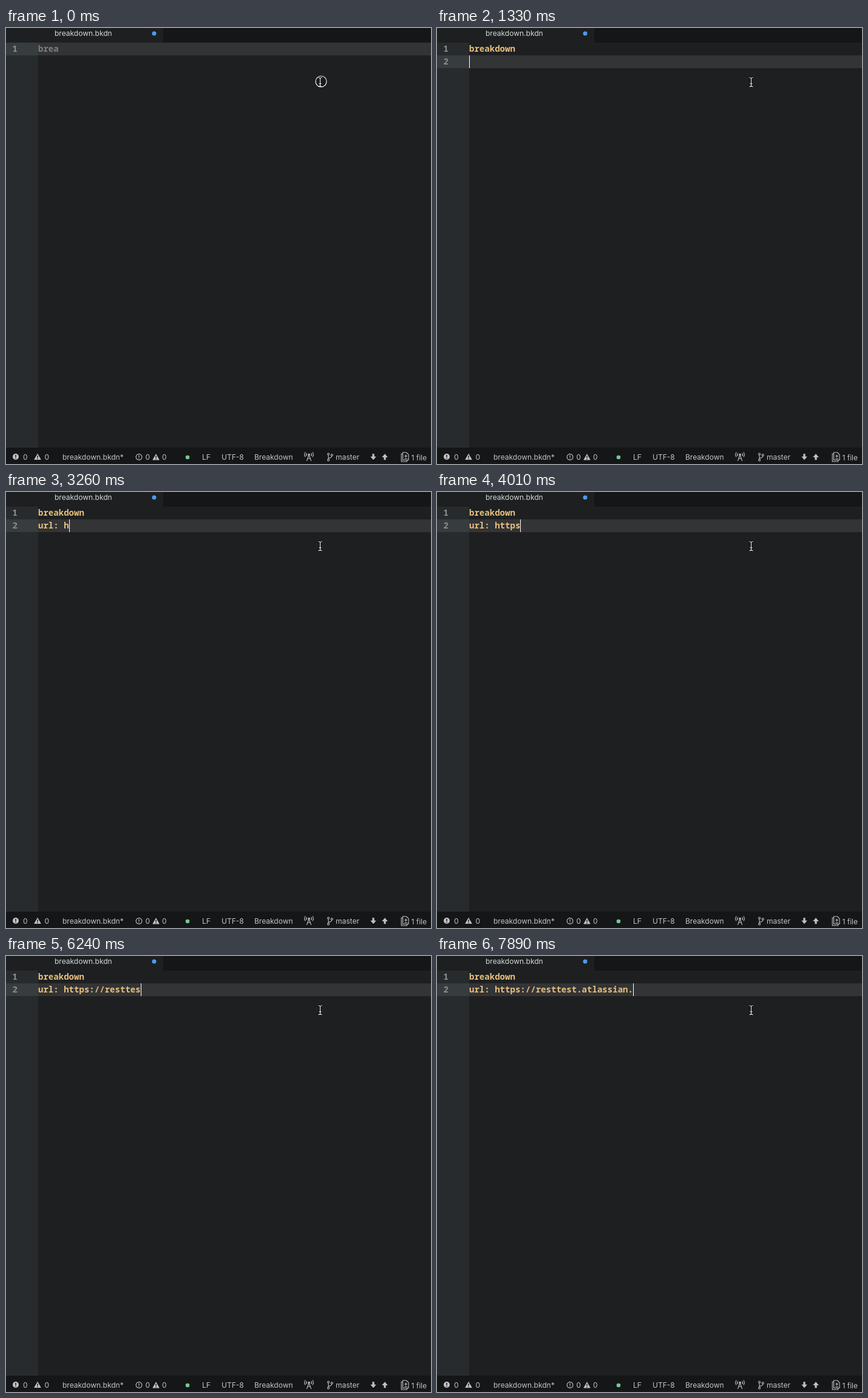
Animation of 700x717 px, one loop 8 s. Source, as an HTML page:

```html
<!DOCTYPE html>
<html lang="en">
<head>
<meta charset="utf-8">
<title>Editor typing</title>
<style>
  html, body { margin: 0; width: 100%; height: 100%; overflow: hidden; background: #1d1f21; }
  svg { display: block; width: 700px; height: 717px; }
  text { font: 12px Inter, "Open Sans", sans-serif; white-space: pre; }
  .code text { font: 600 14px "Noto Sans Mono", "DejaVu Sans Mono", monospace; letter-spacing: .0375px; fill: #e8bf7d; }
  .code .number { fill: #8b8f91; }
  .status { fill: #c0c3c6; }
  .line { fill: none; stroke: #c0c3c6; stroke-width: 1.1; }
  .dark { fill: none; stroke: #141517; stroke-width: 1.5; }
</style>
</head>
<body>
<svg viewBox="0 0 700 717">
  <defs>
    <path id="beam" d="M-3-7.5Q-.6-7.5 0-6Q.6-7.5 3-7.5M0-6V6M-3 7.5Q-.6 7.5 0 6Q.6 7.5 3 7.5M-2 2.5H2" fill="none"/>
    <g id="warning">
      <path d="M0-5.2L5.8 5H-5.8Z"/>
      <path class="dark" d="M0-1.8V1.6M0 2.5V4"/>
    </g>
  </defs>

  <rect width="700" height="717" fill="#1d1f21"/>
  <rect x="259" width="441" height="24" fill="#151618"/>
  <text x="80" y="13" fill="#d5d7d9">breakdown.bkdn</text>
  <circle cx="244" cy="9" r="3.5" fill="#4b9cf1"/>

  <rect y="24" width="53" height="666" fill="#272b2d"/>
  <g id="active">
    <rect width="700" height="21" fill="#323436"/>
    <rect width="53" height="21" fill="#373c3e"/>
  </g>
  <g class="code">
    <text class="number" x="10.5" y="39">1</text>
    <text class="number" x="10.5" y="60" id="second">2</text>
    <text x="53" y="39" id="line0"></text>
    <text x="53" y="60" id="line1"></text>
  </g>
  <rect id="caret" width="1" height="21" fill="#fff"/>

  <g id="click">
    <circle cx="519" cy="88" r="9" fill="#1a1b1c" stroke="#f4f4f4" stroke-width="1.2"/>
    <use href="#beam" x="517.5" y="89" stroke="#eee" stroke-width="1.1"/>
  </g>
  <g id="pointer">
    <use href="#beam" x="517.5" y="89" stroke="#0b0b0b" stroke-width="2.8"/>
    <use href="#beam" x="517.5" y="89" stroke="#f4f4f4" stroke-width="1.1"/>
  </g>

  <rect y="690" width="700" height="27" fill="#151618"/>
  <g class="status">
    <circle cx="16" cy="705" r="5"/>
    <path class="dark" d="M16 702V705.8M16 706.8V708.3"/>
    <text x="28" y="710">0</text>
    <use href="#warning" x="52" y="705"/>
    <text x="63.5" y="710">0</text>
    <text x="93" y="710">breakdown.bkdn*</text>
    <circle class="line" cx="219" cy="705.5" r="4.9"/>
    <path class="line" d="M219 702.5V706.3M219 707.2V708.5"/>
    <text x="229.5" y="710">0</text>
    <use href="#warning" x="247" y="705.5"/>
    <text x="257" y="710">0</text>
    <circle cx="299" cy="706" r="3.3" fill="#73c990"/>
    <text x="323" y="710">LF</text>
    <text x="355" y="710">UTF-8</text>
    <text x="409" y="710">Breakdown</text>

    <circle cx="499" cy="701.5" r="1.7"/>
    <path class="line" d="M499 702L495.3 712M499 702L502.7 712M497 708H501"/>
    <path id="waves" class="line" d="M495.3 699Q493.9 701.5 495.3 704M493.1 697.5Q490.4 701.5 493.1 705.5"/>
    <use href="#waves" transform="matrix(-1 0 0 1 998 0)"/>

    <circle class="line" cx="531" cy="700.7" r="1.5"/>
    <circle class="line" cx="536.7" cy="702.3" r="1.5"/>
    <circle class="line" cx="531" cy="710.5" r="1.5"/>
    <path class="line" d="M531 702.3V709M536.7 704Q536.7 706.5 531 707.5"/>
    <text x="543" y="710">master</text>

    <path id="arrow" d="M603.4 700.3H606.6V704.7H609.8L605 710.3L600.2 704.7H603.4Z"/>
    <use href="#arrow" transform="rotate(180 614.5 705.3)"/>

    <path class="line" d="M653.5 698H659.5L663 701.5V710.5H653.5ZM653.5 700.3H651.2V713H660.5V710.5"/>
    <path class="line" d="M656 704H661M658.5 701.5V706.5M656 708.3H661"/>
    <text x="667.5" y="711">1 file</text>
  </g>
</svg>
<script>
const LOOP = 8000;
const CHAR = 8.4375;
const LINES = ["breakdown", "url: https://resttest.atlassian."];

// Evenly paced typing: [start ms, end ms, first count, last count]
const BURSTS = [
  [140, 290, 4, 5], [590, 590, 6, 6], [890, 1040, 8, 9],
  [1330, 1330, 0, 0], [2080, 2660, 1, 5], [3260, 3710, 6, 9],
  [4010, 4310, 10, 11], [4610, 4760, 12, 13], [5360, 5650, 14, 16],
  [5940, 6840, 18, 24], [6990, 6990, 26, 26], [7290, 7890, 28, 32]
];
const BLINKS = [1630, 2960, 5060];
const NEWLINE = 1330;

const get = id => document.getElementById(id);
const show = (id, on) => get(id).setAttribute("visibility", on ? "visible" : "hidden");

function typed(time) {
  const burst = BURSTS.findLast(b => b[0] <= time);
  if (!burst) return { count: 4, since: -1 };
  const [start, end, first, last] = burst;
  const pace = (end - start) / (last - first) || 1;
  const step = Math.min(last - first, Math.floor((time - start) / pace));
  return { count: first + step, since: start + step * pace };
}

function render(time) {
  const { count, since } = typed(time);
  const line = time >= NEWLINE ? 1 : 0;
  const top = 24 + line * 21;
  const blinkedOff = BLINKS.some(b => b > since && b <= time);
  get("line0").textContent = line ? LINES[0] : LINES[0].slice(0, count);
  get("line0").style.fill = time < 1040 ? "#7d8082" : "";
  get("line1").textContent = line ? LINES[1].slice(0, count) : "";
  get("active").setAttribute("transform", `translate(0 ${top})`);
  get("caret").setAttribute("x", Math.round(53 + count * CHAR));
  get("caret").setAttribute("y", top);
  show("caret", time >= 140 && !blinkedOff);
  show("second", line);
  show("click", time < 140);
  show("pointer", time >= 140);
}

const origin = performance.now();
function tick() {
  render((performance.now() - origin) % LOOP);
  requestAnimationFrame(tick);
}
tick();
</script>
</body>
</html>
```
